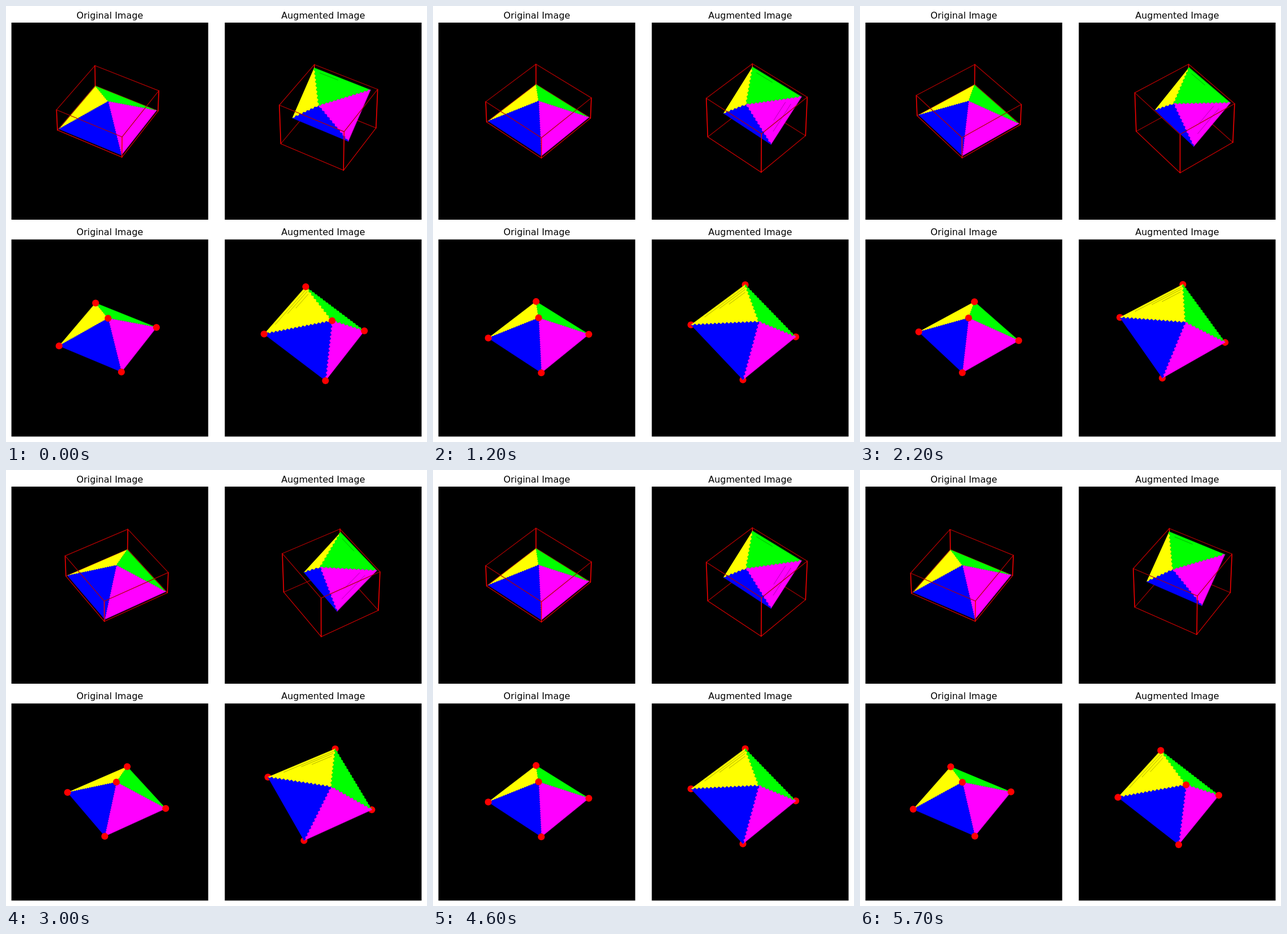
Recreate the animation shown at these times as an HTML page with a canvas. Size 736 px wide and 761 px high, loop 5.8 s.

```html
<!DOCTYPE html>
<html lang="en">
<head>
<meta charset="utf-8">
<title>Pyramid augmentation</title>
<style>
html, body { margin: 0; width: 736px; height: 761px; overflow: hidden; background: #fff; }
canvas { display: block; }
</style>
</head>
<body>
<canvas id="stage" width="736" height="761"></canvas>
<script>
const ctx = document.getElementById('stage').getContext('2d');
const FRAME = 100, FRAMES = 58;
const DIST = 2100, TILT = Math.SQRT1_2, PIVOT = 29.5;
const ROW = 378.5, COLUMN = 373;
const COLORS = ['#ff0', '#0f0', '#f0f', '#00f'];
const rad = deg => deg * Math.PI / 180;

// Points are [right, forward, up]; corners run left, back, right, front, then the apex.
const plain = [[-88, 29.5, 0], [0, 117.5, 0], [88, 29.5, 0], [0, -58.5, 0], [0, 29.5, 44.4]];
const tilted = [[-49.3, 42, 4.8], [4.5, 95, 63.5], [84.2, 18.4, 61], [28.6, -40.2, 7.5], [-11.4, 5.2, 60]];
const turned = [[-105.1, 11.6, 50.6], [-7.9, 107.5, 50.5], [76.3, 23.6, 0], [-20.7, -74.7, 1], [9.7, -4.4, 68]];

// Box given by its centre, half diagonal, skew of the diagonals and height range.
function box(x, f, r, skew, low, high) {
  const s = r * Math.sin(rad(skew)), c = r * Math.cos(rad(skew));
  const ring = z => [[x - c, f + s, z], [x - s, f + c, z], [x + c, f - s, z], [x + s, f - c, z]];
  return [...ring(low), ...ring(high)];
}
const plainBox = box(0, 29.5, 91, 0, -2, 47.3);
const tiltedBox = box(7, 6.8, 85.4, 2, -19.7, 73.9);

function projector(k, col, row) {
  const a = rad(k - 15), sin = Math.sin(a), cos = Math.cos(a);
  return ([u, f, z]) => {
    const g = f * cos - u * sin - PIVOT;
    const s = 1 / (1 + TILT * (g - z) / DIST);
    return [186.2 + col * COLUMN + (u * cos + f * sin) * s,
            197.7 + row * ROW - TILT * (g + z) * s];
  };
}

const mix = (p, q, t) => [p[0] + (q[0] - p[0]) * t, p[1] + (q[1] - p[1]) * t];

// Line from p to q with small teeth, as left by coarse sampling.
function jagged(p, q, step, size) {
  const len = Math.hypot(q[0] - p[0], q[1] - p[1]);
  const n = Math.max(2, Math.round(len / step));
  const nx = (p[1] - q[1]) / len * size, ny = (q[0] - p[0]) / len * size;
  return Array.from({ length: n + 1 }, (_, i) => {
    const [x, y] = mix(p, q, i / n);
    const side = i === 0 || i === n ? 0 : i % 2 ? 1 : -1;
    return [x + nx * side, y + ny * side];
  });
}

function trace(points) {
  ctx.beginPath();
  points.forEach(([x, y]) => ctx.lineTo(x, y));
}

function line(p, q, color, width) {
  trace([p, q]);
  ctx.strokeStyle = color;
  ctx.lineWidth = width;
  ctx.stroke();
}

function pyramid(pts, step, size, rough = -1) {
  const ridges = pts.slice(0, 4).map(p => jagged(p, pts[4], step, size));
  COLORS.forEach((color, i) => {
    const j = (i + 1) % 4;
    const rim = i === rough ? jagged(pts[j], pts[i], 3, 0.8) : [];
    trace([...ridges[i], ...ridges[j].slice().reverse(), ...rim]);
    ctx.closePath();
    ctx.fillStyle = ctx.strokeStyle = color;
    ctx.lineWidth = 0.5;
    ctx.fill();
    ctx.stroke();
  });
}

// Thin dark scratches in face i, parallel to its outer edge.
function streaks(pts, i, list) {
  const p = pts[i], q = pts[(i + 1) % 4], apex = pts[4];
  for (const [depth, from, to] of list) {
    const a = mix(p, apex, depth), b = mix(q, apex, depth);
    line(mix(a, b, from), mix(a, b, to), 'rgba(0,0,0,.38)', 0.8);
  }
}

function boxEdges(pts, behind) {
  for (let i = 0; i < 4; i++) {
    const j = (i + 1) % 4, back = i < 2;
    if (back === behind) line(pts[i], pts[j], back ? '#a00000' : '#d00000', 1.2);
    if ((i === 1) === behind) line(pts[i], pts[i + 4], '#f00000', 1.6);
    if (back === behind) line(pts[i + 4], pts[j + 4], '#b00000', 1.2);
  }
}

function dots(pts) {
  ctx.fillStyle = '#f00';
  for (const [x, y] of pts) {
    ctx.beginPath();
    ctx.arc(x, y, 6, 0, 2 * Math.PI);
    ctx.fill();
  }
}

function panel(col, row) {
  ctx.fillStyle = '#000';
  ctx.fillRect(9.5 + col * COLUMN, 29 + row * ROW, 344, 344);
  ctx.fillText(col ? 'Augmented Image' : 'Original Image', 181.5 + col * COLUMN, 21.8 + row * ROW);
}

function draw(k) {
  ctx.fillStyle = '#fff';
  ctx.fillRect(0, 0, 736, 761);
  ctx.font = '15.8px "DejaVu Sans", sans-serif';
  ctx.textAlign = 'center';
  ctx.lineJoin = ctx.lineCap = 'round';
  for (const row of [0, 1]) for (const col of [0, 1]) panel(col, row);

  let view = projector(k, 0, 0);
  let frame = plainBox.map(view);
  boxEdges(frame, true);
  pyramid(plain.map(view), 2, 0.6);
  boxEdges(frame, false);

  view = projector(k, 1, 0);
  frame = tiltedBox.map(view);
  let pts = tilted.map(view);
  boxEdges(frame, true);
  pyramid(pts, 3.5, 1.2);
  streaks(pts, 1, [[0.08, 0.1, 0.45]]);
  if (k > 5) streaks(pts, 2, [[0.12, 0.15, 0.8], [0.25, 0.1, 0.6]]);
  boxEdges(frame, false);

  pts = plain.map(projector(k, 0, 1));
  pyramid(pts, 2, 0.6);
  dots(pts);

  pts = turned.map(projector(k, 1, 1));
  const dotsBehind = k > 5;
  if (dotsBehind) dots(pts);
  pyramid(pts, 3.5, 1.4, 1);
  streaks(pts, 0, [[0.05, 0.2, 0.98], [0.1, 0.45, 0.97], [0.16, 0.6, 0.95]]);
  if (!dotsBehind) dots(pts);
}

function tick() {
  const n = Math.floor(performance.now() / FRAME) % FRAMES;
  draw(Math.min(n, FRAMES - n));
  requestAnimationFrame(tick);
}
tick();
</script>
</body>
</html>
```
